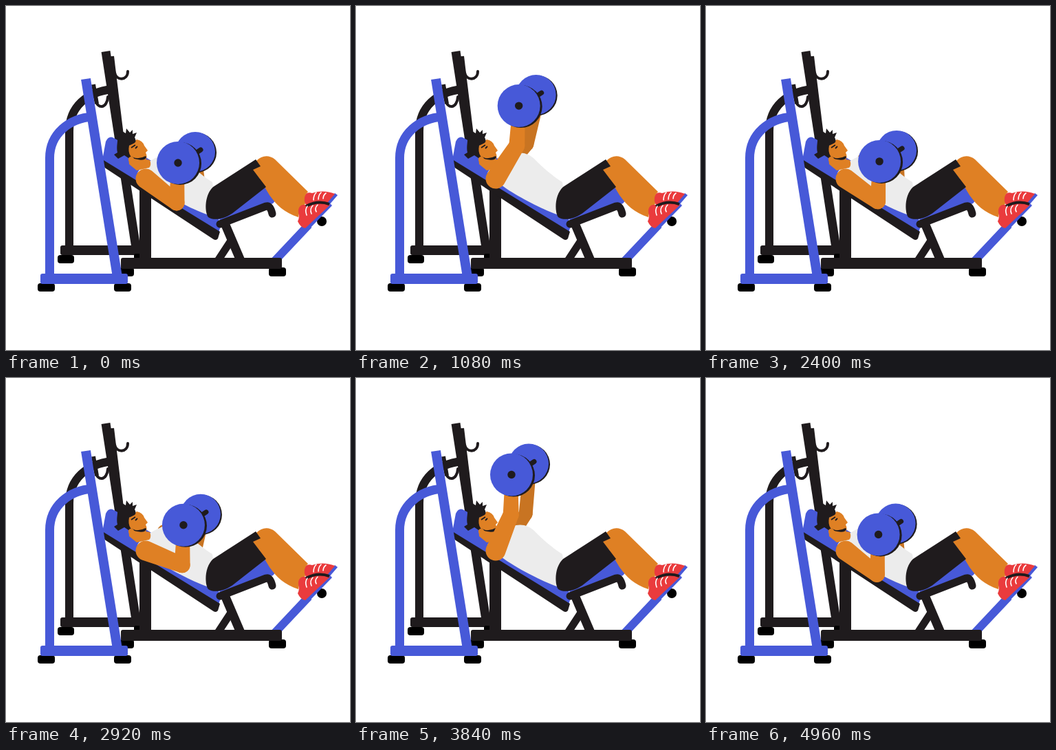
Write an HTML page that moves like this. It is 500x500 px and loops after 5000 ms.

```html
<!DOCTYPE html>
<html lang="en">
<head>
<meta charset="utf-8">
<title>Incline dumbbell press</title>
<style>
  html, body { margin: 0; width: 100%; height: 100%; overflow: hidden; background: #fff; }
  svg { display: block; width: 100%; height: 100%; }
  .blue { fill: #4759d8; }
  .dark { fill: #1f1b1d; }
  .black { fill: #000; }
  .skin { fill: #df8024; }
  .shade { fill: #c87422; }
  .red { fill: #ea3b3d; }
  .shirt { fill: #ececec; }
  .pipe { fill: none; stroke: #1f1b1d; }
  .pipe.b { stroke: #4759d8; }
  .round { stroke-linecap: round; stroke-linejoin: round; }
  .lace { fill: none; stroke: #fff; stroke-width: 1.6; stroke-linecap: round; }
</style>
</head>
<body>
<svg viewBox="0 0 500 500">
  <!-- back rack -->
  <g>
    <path class="pipe" stroke-width="12" d="M92 355V182C92 147 117 125 154 121"/>
    <path class="pipe" stroke-width="13" d="M145 66L190 358"/>
    <path class="pipe" stroke-width="6" d="M154 73L168 188"/>
    <path class="pipe round" stroke-width="4" d="M158 97C160 109 177 109 177 95"/>
    <rect class="dark" x="79" y="348" width="116" height="14" rx="3"/>
    <rect class="black" x="75" y="362" width="24" height="12" rx="4"/>
    <rect class="black" x="186" y="360" width="10" height="8" rx="3"/>
  </g>

  <!-- bench -->
  <g>
    <path class="pipe b" stroke-width="12" d="M390 371L440 318"/>
    <circle class="black" cx="459" cy="313" r="7"/>
    <rect class="black" x="165" y="380" width="21" height="13" rx="4"/>
    <rect class="black" x="382" y="380" width="25" height="13" rx="4"/>
    <rect class="dark" x="194" y="255" width="17" height="115"/>
    <path class="pipe" stroke-width="13" d="M318 316L341 370"/>
    <path class="pipe" stroke-width="11" d="M329 338L308 370"/>
    <rect class="dark" x="167" y="366" width="234" height="16" rx="3"/>
    <path class="blue" d="M140 224L145 197Q149 189 155 191L166 197L300 280L312 320L308 332Z"/>
    <path class="dark" d="M140 223L311 328L308 338Q305 342 300 338L145 236Q139 232 140 223Z"/>
    <path class="blue" d="M296 303L378 263Q385 265 391 276Q394 281 388 287L315 313Z"/>
    <path class="pipe round" stroke-width="11" d="M311 317L378 291Q384 289 387 302"/>
  </g>

  <g>
    <path id="farUpper" class="shade"/>
    <path id="farFore" class="shade"/>
  </g>
  <g id="farDisc">
    <circle class="dark" cx="27" cy="-15" r="29"/>
    <circle class="blue" cx="25" cy="-16" r="29"/>
    <path class="pipe round" stroke-width="7" d="M27 -15L33 -19"/>
  </g>

  <!-- legs and shoes -->
  <g>
    <path class="blue" d="M478 272L482 275L462 298L455 298Z"/>
    <path class="red" d="M433 285C431 275 437 269 445 272C456 268 468 269 478 273L463 291L440 293Z"/>
    <path class="lace" d="M447 282Q447 275 451 271M454 281Q454 275 458 271M461 280Q461 275 465 272"/>
    <path class="skin" d="M358 238L364 225C372 217 382 216 391 223L439 270Q431 277 435 288Q427 291 425 307C404 300 393 289 383 275L368 250Z"/>
    <path class="blue" d="M431 321L470 286L474 290L439 326Z"/>
    <path class="red" d="M425 300C424 290 432 286 440 291C452 286 463 286 471 289L435 323Q428 322 424 313Q427 308 425 300Z"/>
    <path class="pipe" stroke="#000" stroke-width="4" d="M436 291Q453 282 470 288"/>
    <path class="lace" d="M437 304Q434 296 438 291M444 302Q441 295 446 290M451 299Q448 294 453 289"/>
  </g>

  <!-- torso and shorts -->
  <path class="shirt" d="M191 243C196 231 215 222 227 216C239 211 251 214 260 223C271 234 284 246 300 256L304 285L292 303C272 296 232 276 211 260L196 256Z"/>
  <path class="dark" d="M301 263L363 223L370 233L359 238L378 263L332 299C320 309 303 313 294 307C288 298 289 274 301 263Z"/>

  <!-- head -->
  <g>
    <path class="skin" d="M177 205L190 194Q199 196 201 203L206 210L203 213Q206 219 203 223L209 224Q212 231 208 235L190 239L179 230Z"/>
    <path class="dark" d="M163 222L157 216L162 213C160 204 163 197 162 190L168 191L169 182L174 185L175 178L180 184L184 180L184 186L190 184L187 191Q190 196 187 199L179 203Q177 212 181 218L184 222L178 221L172 217Z"/>
    <path class="dark" d="M183 219Q192 224 203 218L204 220Q201 225 194 223.500Q187 223 182 220Z"/>
    <circle class="skin" cx="182" cy="223" r="4"/>
    <path class="pipe" stroke-width="1.8" d="M182 206L188 202M188 207L191 204"/>
  </g>

  <!-- front rack -->
  <g>
    <path class="pipe" stroke-width="6" d="M127 114L132 142"/>
    <path class="pipe round" stroke-width="4" d="M130 136C133 151 147 149 148 132"/>
    <path class="pipe b" stroke-width="13" d="M63.500 395V221C63.500 186 92 163 126 161"/>
    <path class="pipe b" stroke-width="14" d="M116 106L162 394"/>
    <rect class="black" x="46" y="403" width="25" height="12" rx="4"/>
    <rect class="black" x="157" y="403" width="25" height="12" rx="4"/>
    <rect class="blue" x="50" y="389" width="127" height="15" rx="3"/>
  </g>

  <g>
    <path id="nearUpper" class="skin"/>
    <path id="nearFore" class="skin"/>
  </g>
  <g id="nearDisc">
    <circle class="dark" cx="3" cy="1" r="31"/>
    <circle class="blue" r="31"/>
    <circle class="dark" r="5.700"/>
  </g>
</svg>
<script>
  const PERIOD = 2500, TOP = 1344;
  const UPPER = 57, FORE = 58;
  const $ = id => document.getElementById(id);

  // Dumbbell position by time away from the top of the press: [ms, x, y]
  const keys = [
    [0, 226, 140.5], [260, 236.5, 145], [480, 256.7, 160.5], [700, 266, 183],
    [1060, 252, 226], [1160, 250, 228], [1250, 249.6, 228.5]
  ];

  // Monotone cubic interpolation
  const slope = (i, c) => (keys[i + 1][c] - keys[i][c]) / (keys[i + 1][0] - keys[i][0]);
  function tangent(i, c) {
    if (i === 0 || i === keys.length - 1) return 0;
    const a = slope(i - 1, c), b = slope(i, c);
    return a * b > 0 ? 2 * a * b / (a + b) : 0;
  }
  function sample(d, c) {
    let i = 0;
    while (i < keys.length - 2 && d > keys[i + 1][0]) i++;
    const h = keys[i + 1][0] - keys[i][0], s = (d - keys[i][0]) / h, r = 1 - s;
    return r * r * (1 + 2 * s) * keys[i][c] + s * s * (3 - 2 * s) * keys[i + 1][c]
      + h * s * r * (r * tangent(i, c) - s * tangent(i + 1, c));
  }

  // Tapered capsule between two joints
  function limb(a, b, ra, rb) {
    const len = Math.hypot(b[0] - a[0], b[1] - a[1]);
    const nx = (b[1] - a[1]) / len, ny = (a[0] - b[0]) / len;
    const at = (p, r) => `${p[0] + nx * r} ${p[1] + ny * r}`;
    return `M${at(a, ra)}L${at(b, rb)}A${rb} ${rb} 0 0 1 ${at(b, -rb)}`
      + `L${at(a, -ra)}A${ra} ${ra} 0 0 1 ${at(a, ra)}Z`;
  }

  function bend(s, h) {
    const dx = h[0] - s[0], dy = h[1] - s[1];
    const d = Math.min(Math.hypot(dx, dy), UPPER + FORE - 0.01);
    const along = (UPPER * UPPER - FORE * FORE + d * d) / (2 * d);
    const out = Math.sqrt(UPPER * UPPER - along * along);
    return [s[0] + (dx * along - dy * out) / d, s[1] + (dy * along + dx * out) / d];
  }

  function drawArm(name, shoulder, elbow, hand, [rs, re, rh]) {
    $(name + 'Upper').setAttribute('d', limb(shoulder, elbow, rs, re));
    $(name + 'Fore').setAttribute('d', limb(elbow, hand, re, rh));
  }

  function draw(time) {
    const gap = Math.abs(time % PERIOD - TOP);
    const d = Math.min(gap, PERIOD - gap);
    const x = sample(d, 1), y = sample(d, 2);

    const shoulder = [203, 251], elbow = bend(shoulder, [x, y]);
    drawArm('near', shoulder, elbow, [x, y], [14.5, 11.5, 9]);

    // The far elbow slides along a line as the near one drops
    const drop = elbow[1] - 202;
    drawArm('far', [230, 223], [248 + 0.38 * drop, 200 + 0.74 * drop], [x + 26, y - 2], [10, 10, 9.5]);

    for (const id of ['nearDisc', 'farDisc']) $(id).setAttribute('transform', `translate(${x} ${y})`);
  }

  function tick() {
    draw(performance.now());
    requestAnimationFrame(tick);
  }
  tick();
</script>
</body>
</html>
```
